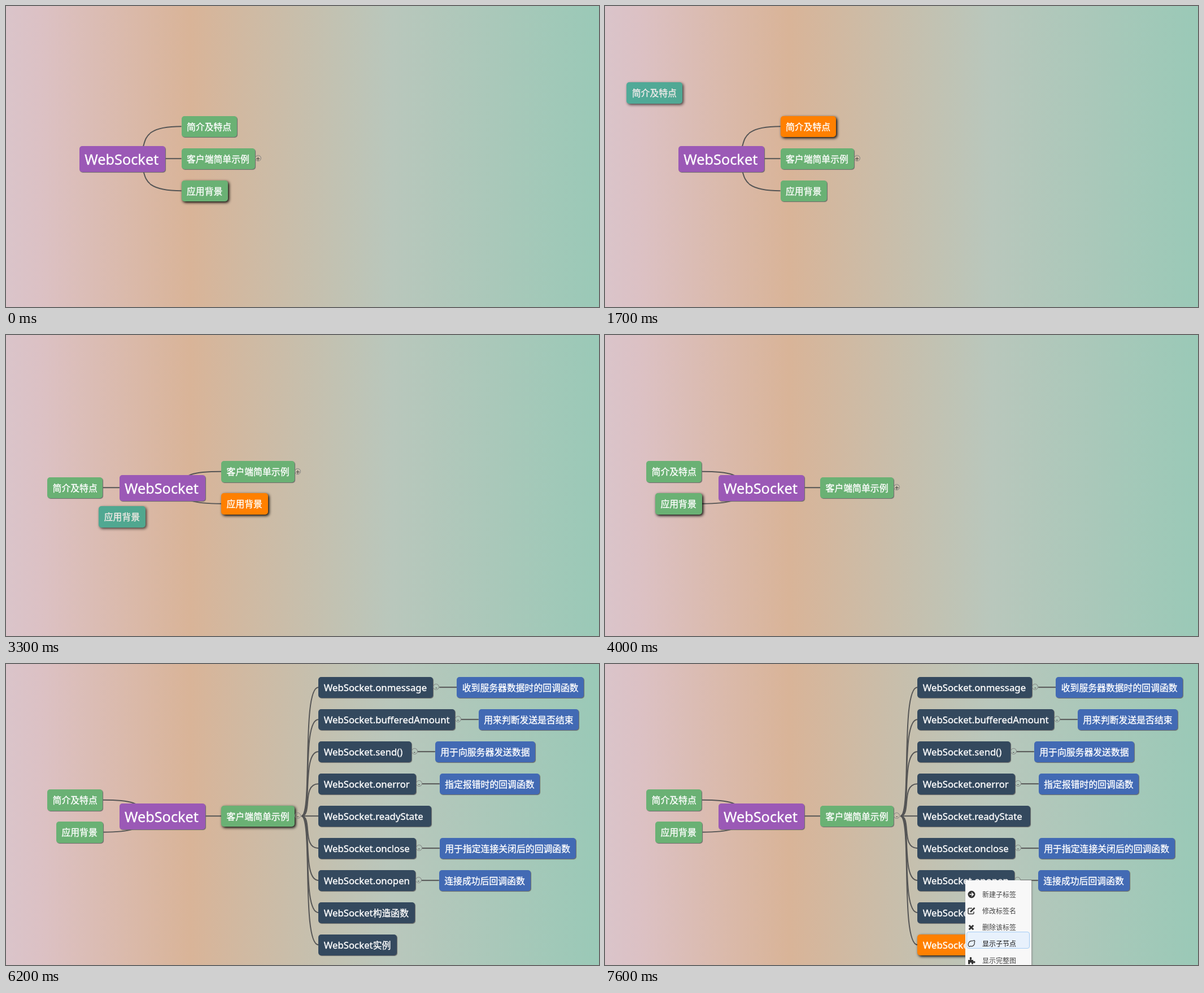
An HTML page for the animation above (8000 ms loop, 1050 by 533 pixels).

```html
<!DOCTYPE html>
<html lang="zh-CN">
<head>
<meta charset="utf-8">
<title>WebSocket mind map</title>
<style>
html, body { margin: 0; width: 100%; height: 100%; overflow: hidden; }
#stage {
  position: relative; width: 1050px; height: 533px; overflow: hidden;
  background: linear-gradient(90deg, #dac4ca, #dcc1c4 6%, #d9b498 31%, #b9c7bc 65%, #9ac9b7);
  font-family: "Noto Sans", "Noto Sans CJK SC", "Noto Sans CJK", sans-serif;
}
#stage > * { position: absolute; box-sizing: border-box; white-space: nowrap; }
#lines { left: 0; top: 0; fill: none; stroke: #555; stroke-width: 2; }
.node {
  height: 37.6px; padding-left: 9.4px; border-radius: 5px; color: #fff;
  font-size: 16.8px; line-height: 37.6px; box-shadow: 1px 1px 1px #666;
  -webkit-text-stroke: .35px #fff;
}
.node i { font: 15.85px/0 "Noto Sans CJK SC", "Noto Sans CJK", sans-serif; }
.root { height: 46px; font-size: 25.3px; line-height: 46px; }
.raised { box-shadow: 2px 2px 5px #000; }
.ghost { opacity: .7; }
.knob {
  width: 11px; height: 11px; border: 1px solid #808080; border-radius: 50%;
  color: #333; font: 10px/12px "DejaVu Sans", sans-serif; text-align: center;
}
.knob.hot { border-color: #222; box-shadow: 0 0 1px #222; }
#menu {
  left: 637.5px; top: 383px; width: 117px; height: 180px; background: #f8f8f8;
  box-shadow: 1px 1px 3px #888;
}
#menu div {
  position: absolute; box-sizing: border-box; left: 2.5px; width: 112px; height: 29.5px; padding-left: 27px;
  border: 1px solid transparent; border-radius: 4px; color: #444;
  font: 12px/39px "Noto Sans CJK SC", "Noto Sans CJK", sans-serif;
}
#menu .hot { background: #e8f1fc; border-color: #a5cdf5; color: #111; }
#menu svg { position: absolute; left: 1px; top: 13px; fill: none; stroke: #333; stroke-width: 1.5; }
</style>
</head>
<body>
<div id="stage"></div>
<script>
const LOOP = 8000, STEP = 100;
const GREEN = '#6ab174', PURPLE = '#9b59b6', DARK = '#34495e', BLUE = '#426ab4',
      ORANGE = '#ff8000', TEAL = '#16a085';
const INTRO = '简介及特点', CLIENT = '客户端简单示例', USAGE = '应用背景';

// label, box width, optional child label
const API = [
  ['WebSocket.onmessage', 203, '收到服务器数据时的回调函数'],
  ['WebSocket.bufferedAmount', 241.5, '用来判断发送是否结束'],
  ['WebSocket.send()', 164.5, '用于向服务器发送数据'],
  ['WebSocket.onerror', 172.5, '指定报错时的回调函数'],
  ['WebSocket.readyState', 200],
  ['WebSocket.onclose', 172.5, '用于指定连接关闭后的回调函数'],
  ['WebSocket.onopen', 171.5, '连接成功后回调函数'],
  ['WebSocket构造函数', 170.5],
  ['WebSocket实例', 139]
];

const MENU = [
  ['新建子标签', '<circle cx="7" cy="7" r="5.7" fill="#333"/><path stroke="#fff" d="M3.5 7H10M7 3.8L10.2 7L7 10.2"/>'],
  ['修改标签名', '<path d="M8 2.5H2.5Q1 2.5 1 4V11Q1 12.5 2.5 12.5H9.5Q11 12.5 11 11V8.5"/><path stroke-width="2.6" d="M5 9L12.5 1.8"/>'],
  ['删除该标签', '<path stroke-width="3" d="M2.7 3.7L10.3 11.3M10.3 3.7L2.7 11.3"/>'],
  ['显示子节点', '<path stroke-width="1.2" d="M3 12.5C-.5 10 1.5 2 8 2.5L12 1.5Q13.5 3 12 5C13.5 10 8 13 5.5 11.5Z"/>'],
  ['显示完整图', '<path fill="#333" stroke="none" d="M1 6H4.5Q2.5 1 5.5 1T6.5 6H10V8.5Q13.5 7 13.5 10T10 11V13.5H7Q7.5 10.5 5.5 10.5T4.5 13.5H1Z"/>']
];

// Pointer drags as [time, x, y] points
const DRAG_INTRO = [[900, 270, 187], [1400, 46, 129], [1600, 46, 129], [1700, 38.3, 135], [1900, 17, 152], [2200, 17, 156]];
const DRAG_USAGE = [[3200, 285, 279], [3300, 164.3, 303], [3500, 104, 323], [3700, 87, 332], [4000, 87, 332]];

function follow(points, t) {
  const i = points.findIndex(p => p[0] > t);
  if (i < 1) return null;
  const [t0, x0, y0] = points[i - 1], [t1, x1, y1] = points[i];
  const k = (t - t0) / (t1 - t0);
  return [x0 + (x1 - x0) * k, y0 + (y1 - y0) * k];
}

const cjkWidth = text => text.length * 15.85 + 19.1;
const markCjk = text => text.replace(/[\u4e00-\u9fff]+/g, '<i>$&</i>');

function node(text, x, y, color, { w = cjkWidth(text), cls = '', raised, selected } = {}) {
  if (raised || selected) cls += ' raised';
  return `<div class="node ${cls}" style="left:${x}px;top:${y}px;width:${w}px;background:${selected ? ORANGE : color}">${markCjk(text)}</div>`;
}

const knob = (right, y, sign, hot) =>
  `<div class="knob ${hot ? 'hot' : ''}" style="left:${right}px;top:${y + 12.2}px">${sign}</div>`;

const curve = (x1, y1, x2, y2) =>
  `<path d="M${x1} ${y1}C${x1 + (x2 - x1) * 2 / 3} ${y1} ${x1} ${y2} ${x2} ${y2}"/>`;

function menu(activeItem) {
  return '<div id="menu">' + MENU.map(([label, icon], i) =>
    `<div class="${i === activeItem ? 'hot' : ''}" style="top:${3.5 + i * 29.3}px"><svg width="14" height="14">${icon}</svg>${label}</div>`
  ).join('') + '</div>';
}

function scene(t) {
  const during = (a, b) => t >= a && t < b;
  const introLeft = t >= 2200, usageLeft = t >= 4000, open = t >= 5500;
  const rootX = introLeft ? 200.5 : 129.8, shift = open ? -1 : 0;
  const rootMid = rootX + 76, midY = 270.2 + shift;
  const rightX = introLeft ? 381.2 : 310.6;
  let lines = '', boxes = '';

  function branch(text, left, y, look) {
    const w = cjkWidth(text), x = left ? 171.5 - w : rightX;
    y += shift;
    lines += curve(rootMid, midY, left ? x + w : x, y + 18.4);
    boxes += node(text, x, y, GREEN, look);
    return x + w;
  }

  branch(INTRO, introLeft, usageLeft ? 223.3 : introLeft ? 251.8 : 194.8,
    { selected: during(800, 2200), raised: during(500, 800) || during(2200, 3000) });
  branch(USAGE, usageLeft, introLeft ? 280.3 : 308.8,
    { selected: during(3000, 4000), raised: t < 800 || during(2700, 3000) || during(4000, 5300) });
  const clientY = introLeft && !usageLeft ? 223.3 : 251.8;
  const clientRight = branch(CLIENT, false, clientY,
    { selected: during(5300, 5500), raised: during(4400, 4900) || during(5500, 7000) });
  boxes += knob(clientRight, clientY + shift, open ? '-' : '+', during(4900, 5900));
  boxes += node('WebSocket', rootX, 248 + shift, PURPLE, { w: 152, cls: 'root' });

  if (open) {
    const hovered = {
      5: during(6000, 6200) || during(6400, 6500),
      7: during(6500, 6600),
      8: during(6800, 7000)
    };
    API.forEach(([text, w, child], i) => {
      const x = 553.3, y = 22.8 + i * 57, right = x + w, lineY = y + 18.4;
      lines += curve(523, midY, x, lineY);
      boxes += node(text, x, y, DARK, { w, raised: hovered[i], selected: i === 8 && t >= 7000 });
      if (child) {
        lines += `<path d="M${right + 11} ${lineY}H${right + 42}"/>`;
        boxes += knob(right, y, '-') + node(child, right + 42, y, BLUE);
      }
    });
  }

  for (const [text, path] of [[INTRO, DRAG_INTRO], [USAGE, DRAG_USAGE]]) {
    const at = follow(path, t);
    if (at) boxes += node(text, ...at, TEAL, { cls: 'ghost', raised: true });
  }
  if (t >= 7200) boxes += menu(t >= 7600 ? 3 : -1);
  return `<svg id="lines" width="1050" height="533">${lines}</svg>${boxes}`;
}

const stage = document.getElementById('stage');
const start = performance.now();
let shown = -1;
function frame() {
  const t = Math.floor((performance.now() - start) % LOOP / STEP) * STEP;
  if (t !== shown) stage.innerHTML = scene(shown = t);
  requestAnimationFrame(frame);
}
frame();
</script>
</body>
</html>
```
